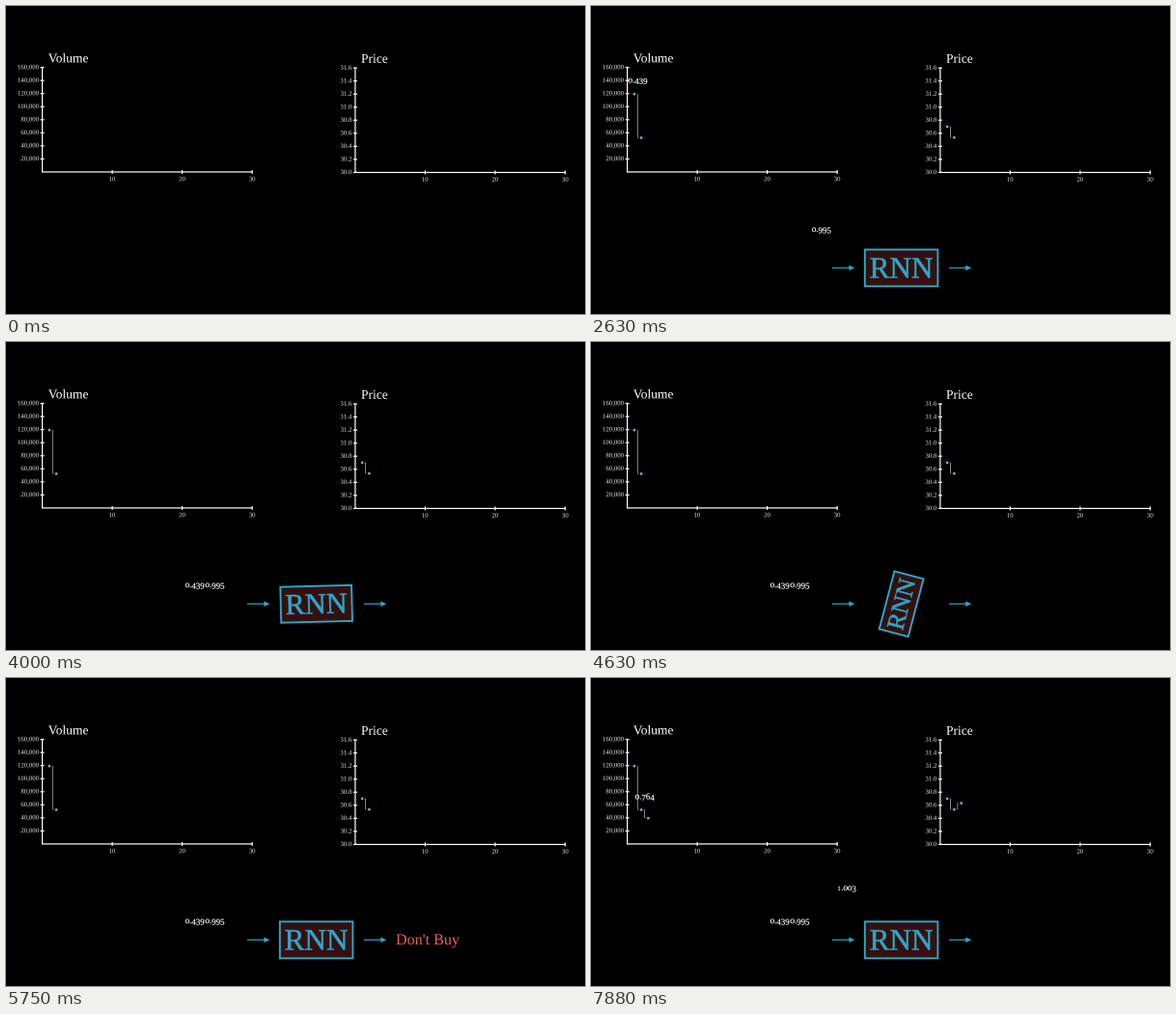
A matplotlib script for the animation above (8 s loop, 600 by 319 pixels).

```python
import numpy as np
import matplotlib.pyplot as plt
from matplotlib.animation import FuncAnimation
from matplotlib.patches import Circle, PathPatch, Polygon, Rectangle
from matplotlib.path import Path
from matplotlib.textpath import TextPath
from matplotlib.transforms import Affine2D

W, H, DPI = 600, 319, 64
FRAMES, STEP = 64, 0.125
PX = 72 / DPI
FONT = {"family": "Liberation Serif"}
WHITE, BLUE, DOT, RED = "#ffffff", "#2ea6cc", "#58c4dd", "#f4645a"

plt.rcParams["path.snap"] = False
fig = plt.figure(figsize=(W / DPI, H / DPI), dpi=DPI, facecolor="black")
ax = fig.add_axes([0, 0, 1, 1])
ax.set(xlim=(0, W), ylim=(H, 0))
ax.axis("off")


def smooth(x):
    """Sigmoid easing, clamped to 0..1."""
    x = np.clip(x, 0, 1)
    edge = 1 / (1 + np.exp(5))
    return float(np.clip((1 / (1 + np.exp(-10 * (x - 0.5))) - edge) / (1 - 2 * edge), 0, 1))


def ease(t, start, length):
    return smooth((t - start) / length)


def add(patch):
    ax.add_patch(patch)
    return patch


def outline(s, size, scale=1.0, dx=0.0, dy=0.0):
    """Glyph outlines with y pointing down."""
    path = TextPath((0, 0), s, size=size * scale, prop=FONT)
    return Affine2D().scale(1, -1).translate(dx, dy).transform_path(path)


def shift(path, x, y):
    return Affine2D().translate(x, y).transform_path(path)


def center(path, x=0, y=0):
    box = path.get_extents()
    return shift(path, x - (box.x0 + box.x1) / 2, y - (box.y0 + box.y1) / 2)


def fill(path, color, weight=0.0, **kw):
    """Filled outline; weight thickens the strokes."""
    return add(PathPatch(path, facecolor=color, lw=weight * PX,
                         edgecolor=color if weight else "none", **kw))


def line(points, color=WHITE, width=1.2, **kw):
    return ax.plot(*zip(*points), color=color, lw=width * PX,
                   solid_capstyle="butt", solid_joinstyle="miter", **kw)[0]


def old_style(s, size=8.9):
    """Number with old-style figures, centred on the origin."""
    parts, x = [], 0
    for ch in s:
        if ch == "0":
            parts.append(outline("o", size, 1.08, x - 0.02 * size))
        elif ch in "12":
            parts.append(outline(ch, size, 0.72, x + 0.07 * size))
        else:
            drop = 0.16 * size if ch in "34579" else 0
            parts.append(outline(ch, size, dx=x, dy=drop))
        x += size * (0.25 if ch == "." else 0.5)
    return center(Path.make_compound_path(*parts))


class Chart:
    UNIT = 7.25
    ROW = 13.53

    def __init__(self, x0, y0, title, labels, first, levels):
        self.x0, self.levels = x0, levels
        x1, top = x0 + 30 * self.UNIT, y0 - 8 * self.ROW
        line([(x0, top - 0.5), (x0, y0 + 0.6)])
        line([(x0, y0), (x1 + 0.5, y0)])
        fill(outline(title, 13.5, dx=x0 + 6.1, dy=y0 - 113.6), WHITE)
        for i, s in enumerate(labels, first):
            y = y0 - i * self.ROW
            line([(x0 - 2, y), (x0 + 2, y)])
            path = outline(s, 6.8)
            fill(shift(path, x0 - 3.8 - path.get_extents().x1, y + 1.7), "#e8e8e8")
        for n in (10, 20, 30):
            x = x0 + n * self.UNIT
            line([(x, y0 - 2), (x, y0 + 2)])
            fill(center(outline(str(n), 6.8), x, y0 + 7.1), "#e8e8e8")
        self.dots = [add(Circle(self.point(i), 1.35, facecolor=DOT, edgecolor="none", zorder=4))
                     for i in range(len(levels))]
        self.steps = [self.step(i) for i in range(len(levels) - 1)]

    def point(self, i):
        return self.x0 + (i + 1) * self.UNIT, self.levels[i]

    def step(self, i):
        """Riser between two dots with faint treads."""
        (xa, ya), (xb, yb) = self.point(i), self.point(i + 1)
        mid = (xa + xb) / 2 - 0.2
        treads = [((xa + 2, ya), (mid, ya)), ((mid, yb), (xb - 2, yb))]
        return [line([(mid, ya), (mid, yb)], "#999999", 0.9, zorder=3),
                *(line(tread, "#484848", 0.7, zorder=2) for tread in treads)]

    def label_at(self, i):
        x = self.x0 + (i + 1.5) * self.UNIT
        return x, min(self.levels[i:i + 2]) - 13.3


class Label:
    def __init__(self, s, start, end, shown, leaves, length):
        self.start, self.end = np.array(start), np.array(end)
        self.shown, self.leaves, self.length = shown, leaves, length
        self.patch = fill(old_style(s), WHITE, 0.15, zorder=5)

    def update(self, t):
        pos = self.start + (self.end - self.start) * ease(t, self.leaves, self.length)
        self.patch.set_transform(Affine2D().translate(*pos) + ax.transData)
        self.patch.set_alpha(ease(t, self.shown, 0.5))


def arrow(x, y=271.2):
    shaft = line([(x, y), (x + 18, y)], BLUE, 1.2)
    tip = add(Polygon([(x + 17.3, y - 2.8), (x + 23.2, y), (x + 17.3, y + 2.8)],
                      facecolor=BLUE, edgecolor="none"))
    return [shaft, tip]


volume = Chart(37.6, 171.9, "Volume", [f"{v:,}" for v in range(20000, 160001, 20000)],
               1, [91.2, 136.5, 145.2])
price = Chart(361.9, 172.4, "Price", [f"{30 + 0.2 * i:.1f}" for i in range(9)],
              0, [125, 136.2, 129.6])

labels = [
    Label("0.995", price.label_at(0), (216.4, 252.6), 1.45, 1.95, 1),
    Label("0.439", volume.label_at(0), (195.6, 252.6), 1.45, 2.95, 1),
    Label("1.003", price.label_at(1), (216.4, 262), 7.083, 7.583, 0.5),
    Label("0.764", volume.label_at(1), (195.6, 262), 7.083, 8.083, 0.5),
]

arrows = arrow(250) + arrow(371)
cell = [
    add(Rectangle((-37.8, -19), 75.6, 38, facecolor="#34110e", edgecolor=BLUE,
                  lw=1.9 * PX, joinstyle="miter", zorder=2)),
    fill(center(outline("RNN", 31.2)), BLUE, 0.5, zorder=3),
]
verdict = fill(outline("Don't Buy", 16.1, dx=404, dy=276), RED)


def fade(parts, alpha):
    for part in parts:
        part.set_alpha(alpha)


def turn(t):
    """Straight-line morph to a quarter turn and back."""
    u = np.clip((t - 3.92) / 0.515, 0, 2)
    a = smooth(1 - abs(u - 1))
    return Affine2D.from_values(1 - a, -a, a, 1 - a, 321.6, 271.3)


def draw(k):
    t = k * STEP
    intro = ease(t, -0.05, 1)
    fade(arrows + cell, intro)
    for chart in (volume, price):
        fade(chart.dots[:2], intro)
        fade(chart.dots[2:], ease(t, 6.09, 0.5))
        fade(chart.steps[0], ease(t, 0.95, 0.5))
        fade(chart.steps[1], ease(t, 6.59, 0.5))
    for label in labels:
        label.update(t)
    for part in cell:
        part.set_transform(turn(t) + ax.transData)
    verdict.set_alpha(ease(t, 4.95, 0.5) * (1 - ease(t, 5.69, 0.4)))
    return []


anim = FuncAnimation(fig, draw, frames=FRAMES, interval=1000 * STEP,
                     init_func=lambda: draw(0), repeat=True, repeat_delay=0)
plt.show()
```
